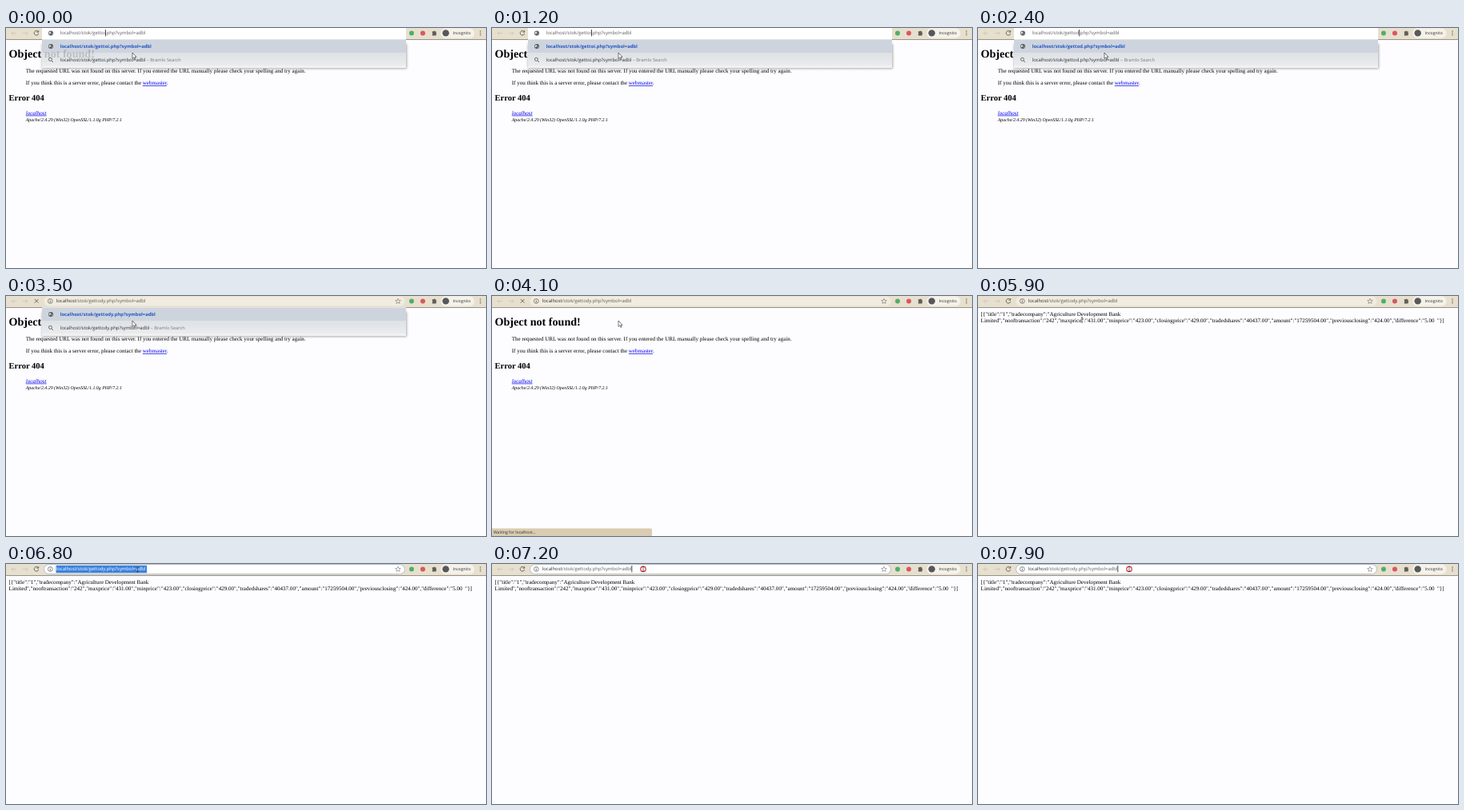
These frames come from a looping animation (600x301 px, 8 s). An HTML page:

```html
<!DOCTYPE html>
<html lang="en">
<head>
<meta charset="utf-8">
<title>Browser lookup</title>
<style>
html, body { margin: 0; width: 100%; height: 100%; overflow: hidden; background: #fdfcfe; }
svg { display: block; width: 600px; height: 301px; }
text { white-space: pre; text-rendering: geometricPrecision; }
.ui { font: 5.92px "Open Sans", "Noto Sans", sans-serif; fill: #2b2d30; }
.page { font: 7.06px "Liberation Serif", serif; fill: #000; }
.title { font-size: 14.1px; font-weight: 700; }
.link { fill: #0000ee; text-decoration: underline .5px; }
.line { fill: none; stroke: #5c5b58; stroke-width: .9; }
</style>
</head>
<body>
<svg viewBox="0 0 600 301">
  <defs>
    <linearGradient id="row" x2="0" y2="1">
      <stop stop-color="#dfe2e5"/><stop offset="1" stop-color="#eaecee"/>
    </linearGradient>
    <filter id="blur" x="-5%" y="-30%" width="110%" height="160%"><feGaussianBlur stdDeviation="1.8"/></filter>
    <g id="globe">
      <circle r="3" fill="#55585c"/>
      <path d="M-2.3-.9L-.5-1.8 .5-.6-.6.3-.9 1.6-2.2.5ZM1 .5L2.3.2 1.3 1.9Z" fill="#eee"/>
    </g>
  </defs>
  <rect width="600" height="301" fill="#fdfcfe"/>

  <g id="missing" class="page">
    <text x="3.5" y="37" class="title">Object not found!</text>
    <text x="24.7" y="56.4">The requested URL was not found on this server. If you entered the URL manually please check your spelling and try again.</text>
    <text x="24.7" y="71.3">If you think this is a server error, please contact the <tspan class="link">webmaster</tspan>.</text>
    <text x="3.5" y="91" font-weight="700" style="font-size:10.5px">Error 404</text>
    <g font-style="italic">
      <text x="24.7" y="108.6"><tspan class="link">localhost</tspan></text>
      <text x="24.7" y="116.5" style="font-size:5.88px">Apache/2.4.29 (Win32) OpenSSL/1.1.0g PHP/7.2.1</text>
    </g>
  </g>
  <g id="json" class="page">
    <text x="3.6" y="24.6">[{"title":"1","tradecompany":"Agriculture Development Bank</text>
    <text x="3.6" y="32.8">Limited","nooftransaction":"242","maxprice":"431.00","minprice":"423.00","closingprice":"429.00","tradedshares":"40437.00","amount":"17259504.00","previousclosing":"424.00","difference":"5.00&#160; "}]</text>
  </g>

  <rect width="600" height="14" fill="#e7e0ce"/>
  <rect y="14" width="600" height=".9" fill="#8b867a"/>
  <path class="line" style="stroke:#cfc7b4" d="M13 6.5H7M9.5 4L7 6.5 9.5 9M21 6.5H27M24.5 4L27 6.5 24.5 9"/>
  <path id="reload" class="line" d="M40.2 4.6A2.8 2.8 0 1 0 40.7 7M40.7 3V5.2H38.5"/>
  <path id="stop" class="line" d="M35.8 4L40.4 8.6M40.4 4L35.8 8.6"/>
  <rect id="box" x="47.5" y=".6" width="451" height="12" rx="6"/>

  <circle cx="507" cy="6.4" r="3" fill="#4fae68"/>
  <circle cx="521" cy="6.4" r="3" fill="#dc5560"/>
  <path d="M532.8 4.2H534.4A1.1 1.1 0 0 1 536.4 4.2H537.6V6A1.1 1.1 0 0 1 537.6 8V9.4H532.8V7.8A1.1 1.1 0 0 0 532.8 6Z" fill="#605e59"/>
  <rect x="543.5" y=".3" width="42" height="12.4" rx="6.2" fill="#f5f2e9"/>
  <circle cx="549.7" cy="6.4" r="4.2" fill="#56585c"/>
  <text class="ui" x="558.6" y="8.4" style="font-size:5.1px">Incognito</text>
  <g fill="#55534e"><circle cx="593" cy="4" r=".7"/><circle cx="593" cy="6.4" r=".7"/><circle cx="593" cy="8.8" r=".7"/></g>

  <g id="drop">
    <rect x="45" y="20" width="456" height="31" fill="#555" opacity=".5" filter="url(#blur)"/>
    <rect id="head" x="45" width="455" height="15" fill="#fff"/>
    <rect x="45" y="14" width="455" height="36" fill="#f1f2f4"/>
    <rect x="45" y="14.5" width="455" height="17" fill="#ced4dd"/>
    <rect x="45" y="31.5" width="455" height="16" fill="url(#row)"/>
    <text id="ghost" class="page title" x="47.8" y="37">not found!</text>
    <use href="#globe" x="56" y="23"/>
    <path class="line" d="M57 41L59 43M57.4 39.3A2 2 0 1 1 53.4 39.3A2 2 0 1 1 57.4 39.3"/>
    <text id="best" class="ui" x="67.7" y="25.1" style="font-weight:700;font-size:5.85px;fill:#2457c5"></text>
    <text class="ui" x="67.7" y="42"><tspan id="query"></tspan><tspan fill="#777a7f" style="font-size:5.7px"> – Bramlo Search</tspan></text>
  </g>

  <g id="idle">
    <circle class="line" cx="55.3" cy="6.4" r="2.9" style="stroke-width:.7"/>
    <path class="line" d="M55.3 4.5V5.3M55.3 6V8.3"/>
    <path class="line" style="stroke-width:.5" d="M490 3.2L490.9 5.4 493.3 5.6 491.5 7.1 492.1 9.4 490 8.1 487.9 9.4 488.5 7.1 486.7 5.6 489.1 5.4Z"/>
  </g>
  <use id="site" href="#globe" x="56" y="6.4"/>
  <rect id="mark" x="62.5" y="1.8" width="113.5" height="9.4" fill="#3b82dc"/>
  <text id="url" class="ui" y="8.4"><tspan id="host">localhost</tspan><tspan id="path" fill="#5a5c5f"></tspan></text>
  <rect id="caret" y="2" width=".8" height="8.4" fill="#222"/>

  <g id="status">
    <path d="M0 291.5H198.5Q200 291.5 200 293V301H0Z" fill="#d9ccb0"/>
    <text class="ui" x="2" y="298.4" style="font-size:5.1px">Waiting for localhost...</text>
  </g>

  <path id="arrow" d="M158 31V38.4L159.7 36.9 160.9 39.4 162 38.9 160.9 36.4H163Z" fill="#fff" stroke="#222" stroke-width=".6"/>
  <g id="beam">
    <circle id="ring" r="3.2" fill="#fff" stroke="#d6333c" stroke-width="1.2"/>
    <path d="M-1.2-3H1.2M0-3V3M-1.2 3H1.2" stroke="#333" stroke-width=".7"/>
  </g>
</svg>
<script>
const el = id => document.getElementById(id);
const show = (id, on) => el(id).style.opacity = Number(on);
const within = (t, a, b) => t >= a && t < b;
const ramp = (t, a, b) => Math.min(1, Math.max(0, (t - a) / (b - a)));

// [start, value] lists: the last entry already begun
const at = (list, t) => list.filter(e => e[0] <= t).pop();
const words = [[0, "gettoi"], [100, "gettoid"], [500, "gettoi"], [1700, "getto"], [2400, "gettod"], [2800, "gettody"]];
const route = [[0, 158, 35], [5800, 158, 35], [5900, 130, 30], [6200, 112, 19], [6600, 140, 8], [7000, 189, 6.4], [8000, 189, 6.4]];

function pointer(t) {
  const i = route.findIndex(p => p[0] > t), a = route[i - 1], b = route[i];
  const k = ramp(t, a[0], b[0]);
  return [a[1] + (b[1] - a[1]) * k, a[2] + (b[2] - a[2]) * k];
}

function draw(now) {
  const t = Math.floor(now % 8000 / 100) * 100;
  const typing = t < 3500, focus = t >= 6600, loaded = t >= 4800;
  const word = at(words, t)[1];
  const tail = `/stok/${word}.php?symbol=adbl`;
  const x = typing ? 67.7 : 62.8;

  show("missing", !loaded);
  show("json", loaded);
  show("stop", within(t, 3500, 5100));
  show("reload", !within(t, 3500, 5100));
  el("box").setAttribute("fill", focus ? "#fff" : "#f1ecdf");
  el("box").setAttribute("stroke", focus ? "#b4bccb" : "none");

  show("drop", t < 3600 ? 1 : t < 3700 ? .4 : 0);
  show("head", typing);
  show("ghost", t < 100 ? .16 : 0);
  show("site", typing);
  show("idle", !typing);
  el("best").textContent = el("query").textContent = "localhost" + tail;

  const marked = within(t, 6600, 7200) || within(t, 7800, 7900);
  show("mark", marked);
  el("url").setAttribute("x", x);
  el("path").textContent = tail;
  el("host").style.fill = marked ? "#fff" : typing ? "#5a5c5f" : "";
  el("path").style.fill = marked ? "#fff" : "";

  const blinkOff = within(t, 1000, 1200) || within(t, 2200, 2400) || t >= 3300;
  show("caret", typing ? !blinkOff : focus && !marked);
  const before = typing ? 15 + word.length : 9 + tail.length;
  el("caret").setAttribute("x", x + el("url").getSubStringLength(0, before));

  show("status", ramp(t, 4000, 4100) * (1 - ramp(t, 5200, 5400)));
  const [px, py] = pointer(t);
  show("arrow", t < 5900);
  show("beam", t >= 5900);
  show("ring", t >= 7100 && t !== 7800);
  el("beam").setAttribute("transform", `translate(${px} ${py})`);
}

function loop() {
  draw(performance.now());
  requestAnimationFrame(loop);
}
loop();
</script>
</body>
</html>
```
